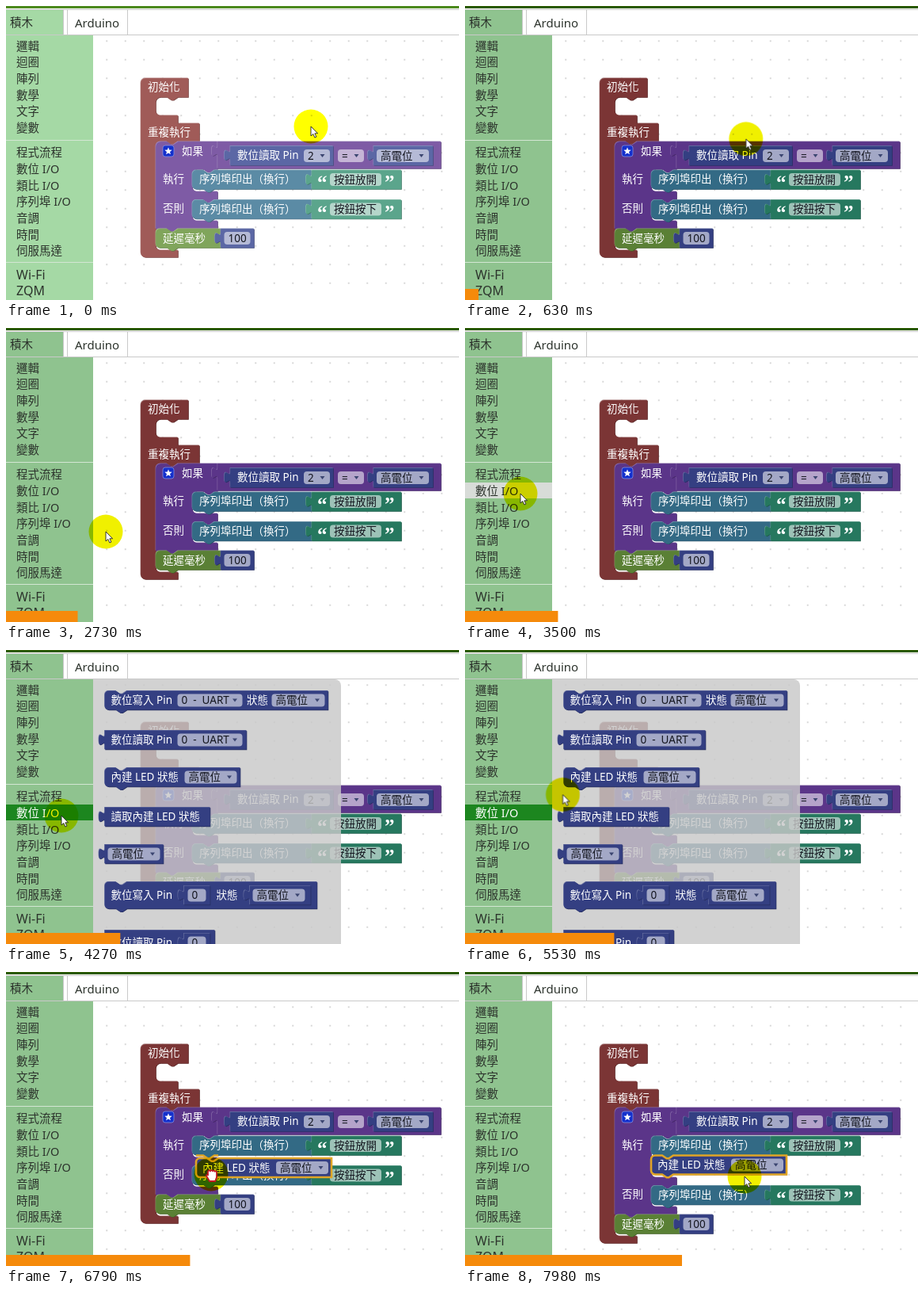
These frames come from a looping animation (572x371 px, 8000 ms). An HTML page:

```html
<!DOCTYPE html>
<html lang="zh-Hant">
<head>
<meta charset="utf-8">
<title>Block editor</title>
<style>
html, body { margin: 0; width: 100%; height: 100%; overflow: hidden; background: #fff; }
svg {
  display: block; width: 572px; height: 371px;
  font-family: "Noto Sans", "Noto Sans CJK TC", "Noto Sans CJK JP", "Noto Sans CJK", sans-serif;
  font-size: 13.5px; fill: #fff; animation: tint 8s infinite step-end;
}
text { white-space: pre; }
.menu { font-size: 14.5px; fill: #2c332c; }
.quote { font: 700 25px "Liberation Serif", serif; }
.light { fill: color-mix(in srgb, var(--c) 72%, #fff); }
.dark { fill: color-mix(in srgb, var(--c) 70%, #000); }
.main { fill: var(--c); }
.box { fill: #fff; fill-opacity: .55; }
.ink { fill: #14161f; }
.ring { fill: none; stroke: #e0a526; stroke-width: 2.6; }

@keyframes tint {
  0% {
    --top: #4d8a1e; --green: #a5d9a5; --maroon: #a05b58; --purple: #7e5ba5; --blue: #5b8ba5;
    --teal: #5ba58c; --indigo: #5b67a5; --olive: #80a55b; --spot: #ffff00;
  }
  0.875%, 100% {
    --top: #2a5a00; --green: #8fc38f; --maroon: #7b3535; --purple: #5b3589; --blue: #336a85;
    --teal: #26785f; --indigo: #343f82; --olive: #5a8035; --spot: #f0f000;
  }
}

.move { animation: move 8s infinite ease-in-out; }
@keyframes move {
  0%, 2.6% { transform: translate(385px, 152px); }
  17.5% { transform: translate(270px, 212px); }
  34.1% { transform: translate(126px, 257px); }
  43.75%, 58% { transform: translate(70px, 209px); }
  68.5%, 69.2% { transform: translate(123.5px, 182.5px); }
  72.5%, 75% { transform: translate(144px, 170px); }
  84.8%, 89.4% { transform: translate(259px, 255px); }
  99%, 100% { transform: translate(353px, 258px); }
}
.drag { animation: drag 8s infinite ease-in-out; }
@keyframes drag {
  0%, 75% { transform: translate(0, 0); }
  84.8%, 100% { transform: translate(115px, 86px); }
}
.spot { fill: var(--spot); mix-blend-mode: multiply; }

.bar { fill: #f58a0b; animation: bar 8s infinite steps(112, start); }
@keyframes bar {
  0%, 2.1% { transform: scaleX(0); }
  100% { transform: scaleX(1); }
}

.before, .after, .flyout, .held, .near, .hover, .arrow { animation: 8s infinite step-end; }
.before { animation-name: before; }
.after { animation-name: after; }
.flyout { animation-name: flyout; }
.held { animation-name: held; }
.near { animation-name: near; }
.hover { animation-name: hover; }
.arrow { animation-name: arrow; }
@keyframes before { 0% { opacity: 1; } 89.4%, 100% { opacity: 0; } }
@keyframes after { 0% { opacity: 0; } 89.4%, 100% { opacity: 1; } }
@keyframes flyout { 0% { opacity: 0; } 50% { opacity: 1; } 76.1%, 100% { opacity: 0; } }
@keyframes held { 0% { opacity: 0; } 75% { opacity: 1; } 89.4%, 100% { opacity: 0; } }
@keyframes near { 0% { opacity: 0; } 83% { opacity: 1; } 89.4%, 100% { opacity: 0; } }
@keyframes hover { 0% { opacity: 0; } 42% { opacity: 1; } 50%, 100% { opacity: 0; } }
@keyframes arrow { 0% { opacity: 1; } 75% { opacity: 0; } 89.4%, 100% { opacity: 1; } }
</style>
</head>
<body>
<svg id="stage" viewBox="0 0 572 371"></svg>
<script>
const NOTCH = 'l5.6 3.8h2.8l5.6-3.8';
const NOTCH_BACK = 'l-5.6 3.8h-2.8l-5.6-3.8';

// Outlines
const stmtPath = (x, y, w, h = 24) =>
  `M${x} ${y + 5}a5 5 0 0 1 5-5H${x + 14}${NOTCH}H${x + w}v${h}H${x + 28}${NOTCH_BACK}H${x + 5}a5 5 0 0 1-5-5z`;
const valuePath = (x, y, w, h = 24) =>
  `M${x} ${y}h${w}v${h}H${x}V${y + 18.8}c0-9.4-7.5 7.5-7.5-7s7.5 2.3 7.5-7z`;
const mouth = (x, top, bottom) =>
  `H${x + 28}${NOTCH_BACK}H${x + 6}a6 6 0 0 0-6 6V${bottom - 6}a6 6 0 0 0 6 6`;

// Parts
const shape = (color, d) => `<g style="--c:var(--${color})">` +
  `<path class="light" d="${d}" transform="translate(-.4 -.4)"/>` +
  `<path class="dark" d="${d}" transform="translate(.8 .8)"/>` +
  `<path class="main" d="${d}" transform="translate(.2 .2)"/></g>`;
const stmt = (color, ...box) => shape(color, stmtPath(...box));
const value = (color, ...box) => shape(color, valuePath(...box));
const label = (x, cy, s, cls = '') => `<text class="${cls}" x="${x}" y="${cy + 4.8}">${s}</text>`;
const field = (x, cy, w, s) =>
  `<rect class="box" x="${x}" y="${cy - 8}" width="${w}" height="16" rx="4"/>` + label(x + 5, cy, s, 'ink');
const drop = (x, cy, w, s) => field(x, cy, w, s) +
  `<path fill="#3b4570" d="M${x + w - 12.5} ${cy - 2}h6l-3 4z"/>`;
const quote = (x, cy, s) => `<text class="quote" x="${x}" y="${cy + 12.5}">${s}</text>`;

const printRow = (y, s) => stmt('blue', 235, y, 151) + label(244, y + 11.5, '序列埠印出（換行）') +
  value('teal', 386, y, 113) + quote(393, y + 11.5, '“') + field(409, y + 12, 65, s) + quote(478, y + 11.5, '”');

const ledBlock = (x, y) => stmt('indigo', x, y, 171) + label(x + 8, y + 12, '內建 LED 狀態') +
  drop(x + 101, y + 12, 66, '高電位') + `<path class="ring" d="${stmtPath(x, y, 171)}"/>`;

function star(cx, cy, r) {
  const pts = Array.from({ length: 10 }, (_, i) => {
    const a = i * Math.PI / 5, q = i % 2 ? r * .42 : r;
    return `${cx + q * Math.sin(a)},${cy - q * Math.cos(a)}`;
  });
  return `<polygon points="${pts.join(' ')}"/>`;
}

// grow: extra height of the first branch of the condition
function program(grow) {
  const g = grow;
  const loop = `M170 97a6 6 0 0 1 6-6H230V115${mouth(189, 115, 138)}H217V148H244V171` +
    `${mouth(189, 171, 308 + g)}H217V${317 + g}H176a6 6 0 0 1-6-6z`;
  const cond = `M189 177a6 6 0 0 1 6-6H203${NOTCH}H267V206${mouth(235, 206, 234 + g)}H267V${244 + g}` +
    `${mouth(235, 244 + g, 271 + g)}H267V${281 + g}H217${NOTCH_BACK}H189z`;
  return shape('maroon', loop) + label(179, 102.5, '初始化') + label(179, 159, '重複執行') +
    shape('purple', cond) +
    '<rect x="198" y="176" width="14" height="14" rx="3" fill="#1430cc" stroke="#8f9be6" stroke-width=".7"/>' +
    star(205, 183.3, 5) +
    label(222, 183.5, '如果') + label(198, 218, '執行') + label(198, 255 + g, '否則') +
    value('purple', 267, 171, 282, 34) +
    value('indigo', 283, 176.5, 130, 24.5) + label(292, 188.5, '數位讀取 Pin') + drop(376, 189, 33, '2') +
    drop(419, 189, 33, '=') + value('indigo', 464, 176.5, 75, 24.5) + drop(468, 189, 66, '高電位') +
    printRow(207, '按鈕放開') + printRow(244.5 + g, '按鈕按下') +
    (g ? ledBlock(235, 231.5) : '') +
    stmt('olive', 189, 281 + g, 82) + label(198, 293 + g, '延遲毫秒') +
    value('indigo', 271, 281 + g, 42) + field(275.5, 293 + g, 33, '100');
}

function palette() {
  const uart = '0  -  UART';
  return '<path fill="#c9c9c9" fill-opacity=".82" d="M110 37H415a8 8 0 0 1 8 8V371H110z"/>' +
    '<g transform="translate(-.5 -.6)">' +
    stmt('indigo', 125, 52, 282) + label(133, 64, '數位寫入 Pin') + drop(217, 64, 82, uart) +
    label(304.5, 64, '狀態') + drop(336, 64, 67, '高電位') +
    value('indigo', 125, 102, 179) + label(133, 114, '數位讀取 Pin') + drop(217, 114, 82, uart) +
    stmt('indigo', 125, 149, 171) + label(133, 161, '內建 LED 狀態') + drop(226, 161, 66, '高電位') +
    value('indigo', 125, 199, 133) + label(133, 211, '讀取內建 LED 狀態') +
    value('indigo', 125, 246, 74) + drop(129, 258, 66, '高電位') +
    stmt('indigo', 125, 293, 268, 34) + label(133, 310, '數位寫入 Pin') +
    value('indigo', 225, 298, 33) + field(230, 310, 23, '0') + label(266, 310, '狀態') +
    value('indigo', 308, 298, 77) + drop(312, 310, 66, '高電位') +
    value('indigo', 125, 354, 139, 34) + label(133, 370, '數位讀取 Pin') +
    value('indigo', 225, 358, 33) + field(230, 370, 23, '0') + '</g>';
}

function menu() {
  const groups = [
    [50.5, ['邏輯', '迴圈', '陣列', '數學', '文字', '變數']],
    [185, ['程式流程', '數位 I/O', '類比 I/O', '序列埠 I/O', '音調', '時間', '伺服馬達']],
    [339.5, ['Wi-Fi', 'ZQM']]
  ];
  const items = groups.flatMap(([y, names]) => names.map((s, i) =>
    `<text x="13" y="${y + i * 20.65 + 5.3}"${y > 330 ? ' font-size="16"' : ''}>${s}</text>`));
  return '<rect y="37" width="110" height="334" fill="var(--green)"/>' +
    '<path stroke="#d3e6d3" d="M0 169.5H110M0 323.5H110"/>' +
    '<rect class="hover" y="195" width="110" height="20" fill="#d8dcd8"/>' +
    `<g class="menu">${items.join('')}</g>` +
    '<g class="flyout"><rect y="195" width="110" height="20" fill="#1c861f"/>' +
    '<text x="13" y="210.9" font-size="14.5">數位 I/O</text></g>';
}

const header = '<rect width="572" height="37" fill="#fff"/>' +
  '<rect width="572" height="3" fill="var(--top)"/>' +
  '<rect y="5" width="72" height="31" fill="var(--green)"/>' +
  '<path fill="none" stroke="#c9c9c9" d="M0 4.5H572M0 36.5H572M72.5 5V36M77.5 5V36M153.5 5V36"/>' +
  '<g class="menu"><text x="5" y="26.3">積木</text><text x="87" y="26.5" font-size="15">Arduino</text></g>';

const pointer = '<g class="move"><path class="arrow" fill="#fff" stroke="#222" stroke-width=".9" ' +
  'd="M0 0V12L2.8 9.5 4.9 14 6.9 13.1 4.9 8.8H8.6z"/>' +
  '<path class="held" fill="#fff" stroke="#c41822" stroke-width="1.8" ' +
  'd="M-4-3q1.5-3 3-.8 1.5-2 3 0 1.5-1.5 2.7.5 2.3-1 2.3 1.5V4L5 9H-2L-5.5 3q-1.5-2.5 1.5-2z"/></g>';

document.getElementById('stage').innerHTML =
  '<defs><pattern id="grid" x="115.5" y="32.5" width="23.5" height="23.5" patternUnits="userSpaceOnUse">' +
  '<rect x="11" y="11" width="1.5" height="1.5" fill="#bbb"/></pattern></defs>' +
  '<rect width="572" height="371" fill="#fff"/><rect width="572" height="371" fill="url(#grid)"/>' +
  header + `<g class="before">${program(0)}</g><g class="after">${program(25)}</g>` + menu() +
  `<g class="flyout">${palette()}</g>` +
  `<g class="held"><g class="drag">${ledBlock(125, 149)}</g></g>` +
  `<path class="ring near" d="M240 231.5h9${NOTCH}h5"/>` +
  '<circle class="spot move" r="21.5"/>' + pointer +
  '<rect class="bar" y="357" width="274" height="14"/>';
</script>
</body>
</html>
```
